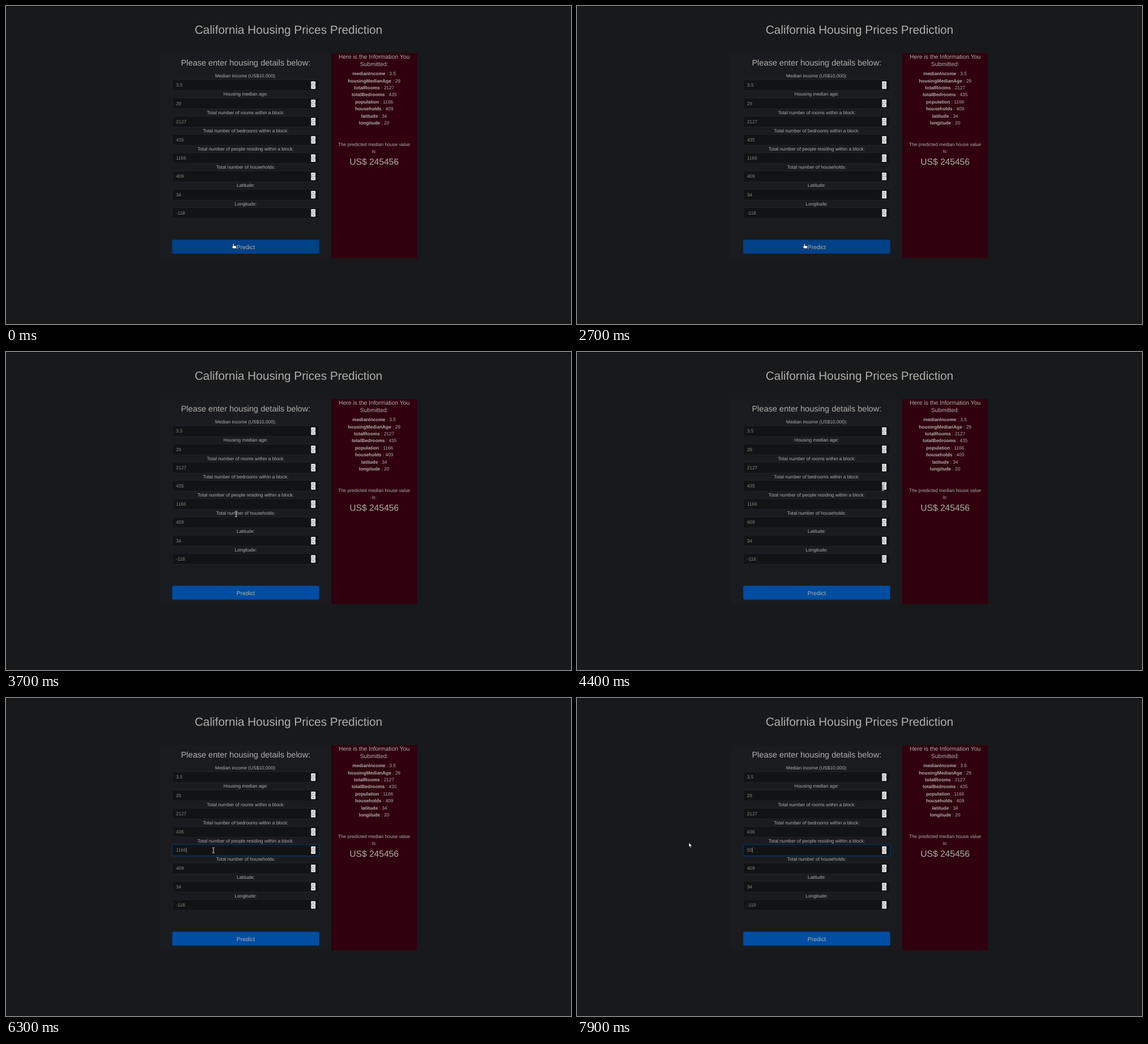
An HTML page that plays this animation: 997x561 px, repeating every 8 s.

```html
<!DOCTYPE html>
<html lang="en">
<head>
<meta charset="utf-8">
<title>Housing prices</title>
<style>
  html, body { margin: 0; width: 100%; height: 100%; overflow: hidden; background: #18191a; }
  svg { display: block; width: 997px; height: 561px; }
  text { font-family: "Liberation Sans", Arial, sans-serif; font-size: 8.31px; fill: #b0aeab; text-rendering: geometricPrecision; }
  .mid { text-anchor: middle; }
  .value { fill: #8b867e; }
  .bold { font-weight: bold; }
</style>
</head>
<body>
<svg id="stage" viewBox="0 0 997 561" xmlns="http://www.w3.org/2000/svg"></svg>
<script>
const LOOP = 8000, STEP = 100;
const FORM_X = 422.95, INFO_X = 649.6, VALUE_X = 300, ROW = 32.2;
const stage = document.getElementById('stage');

function add(tag, attrs, parent = stage) {
  const el = document.createElementNS('http://www.w3.org/2000/svg', tag);
  for (const key in attrs) el.setAttribute(key, attrs[key]);
  parent.append(el);
  return el;
}

function rect(x, y, width, height, fill, more) {
  return add('rect', { x, y, width, height, fill, ...more });
}

function label(str, x, y, size = 8.31, cls = 'mid') {
  const el = add('text', { x, y, class: cls, style: `font-size:${size}px` });
  el.textContent = str;
  return el;
}

// Page
rect(0, 0, 997, 1, '#0a0b0b');
rect(271.8, 83.2, 302.3, 361.8, '#1a1b1f');
rect(574.1, 83.2, 151.1, 361.8, '#30000e');
label('California Housing Prices Prediction', 498.5, 49.2, 20.77);
label('Please enter housing details below:', FORM_X, 105.2, 14.54);

// Form
const fields = [
  ['Median income (US$10,000):', '3.5'],
  ['Housing median age:', '29'],
  ['Total number of rooms within a block:', '2127'],
  ['Total number of bedrooms within a block:', '435'],
  ['Total number of people residing within a block:', '1166'],
  ['Total number of households:', '409'],
  ['Latitude:', '34'],
  ['Longitude:', '-118']
];

function spinner(cy) {
  const g = add('g', { transform: `translate(542.2 ${cy})`, fill: 'none', stroke: '#333', 'stroke-width': 0.9 });
  add('rect', { x: -3.8, y: -6.6, width: 7.6, height: 13.2, fill: '#f2f2f2', stroke: 'none' }, g);
  add('path', { d: 'M-3.8 0H3.8', stroke: '#777' }, g);
  add('path', { d: 'M-2.1-2.2L0-4.2 2.1-2.2M-2.1 2.2L0 4.2 2.1 2.2' }, g);
}

const inputs = fields.map(([name, value], i) => {
  const cy = 139.6 + i * ROW;
  label(name, FORM_X, 126.2 + i * ROW);
  const ring = rect(292.3, cy - 10.65, 261.3, 21.3, 'none',
    { rx: 2.8, stroke: '#004b9d', 'stroke-opacity': 0.28, 'stroke-width': 1.7, opacity: 0 });
  const box = rect(293.4, cy - 9.6, 259.1, 19.2, '#111315', { rx: 2, stroke: '#2a2d2f', 'stroke-width': 0.6 });
  const mark = rect(VALUE_X, cy - 4.7, 0, 9.4, '#003b83');
  const text = label(value, VALUE_X, cy + 2.7, 8.31, 'value');
  const caret = rect(0, cy - 4.7, 0.6, 9.4, '#b0aeab', { opacity: 0 });
  spinner(cy);
  return { ring, box, mark, text, caret };
});

const button = rect(293.35, 412.4, 259.2, 24.4, '#004da1', { rx: 2.4, stroke: '#00428a', 'stroke-width': 0.5 });
label('Predict', FORM_X, 428.6, 10.39);

// Submitted values
label('Here is the Information You', INFO_X, 93.4, 10.39);
label('Submitted:', INFO_X, 105.9, 10.39);
[
  ['medianIncome', '3.5'], ['housingMedianAge', '29'], ['totalRooms', '2127'], ['totalBedrooms', '435'],
  ['population', '1166'], ['households', '409'], ['latitude', '34'], ['longitude', '20']
].forEach(([key, value], i) => {
  const line = label('', INFO_X, 122.1 + i * 12.46);
  add('tspan', { class: 'bold' }, line).textContent = key;
  line.append(' : ' + value);
});
label('The predicted median house value', INFO_X, 246.8);
label('is:', INFO_X, 259.3);
label('US$ 245456', INFO_X, 279.8, 15.58);

// Pointers, each drawn around its hot spot
const outline = { fill: '#fff', stroke: '#0c0c0c', 'stroke-width': 0.7, 'stroke-linejoin': 'round' };
const beam = 'M-1.8-4.4Q0-4.4 0-3.4Q0-4.4 1.8-4.4M0-3.6V3.6M-1.8 4.4Q0 4.4 0 3.4Q0 4.4 1.8 4.4';
const pointers = { hand: add('g', {}), beam: add('g', {}), arrow: add('g', {}) };
add('path', { d: 'M-1 1Q-1 0 0 0T1 1V3.5L4.8 4.3Q5.8 4.6 5.6 6L4.9 8.9H0L-3 5.8Q-3.2 4.2-1 5.2Z', ...outline }, pointers.hand);
add('path', { d: beam, fill: 'none', stroke: '#d8d8d8', 'stroke-width': 1.6 }, pointers.beam);
add('path', { d: beam, fill: 'none', stroke: '#151515', 'stroke-width': 0.55 }, pointers.beam);
add('path', { d: 'M0 0V8.2L1.9 6.5 3.2 9.5 4.5 8.9 3.2 6H5.7Z', ...outline }, pointers.arrow);

// time, x, y, pointer
const path = [
  [0, 401.2, 419, 'hand'],
  [3500, 401.2, 419, 'hand'],
  [3600, 403, 352, 'beam'],
  [3700, 406, 285.5, 'beam'],
  [3800, 424, 238, 'beam'],
  [3900, 454, 210, 'beam'],
  [4000, 488, 202, 'beam'],
  [4200, 529, 224, 'beam'],
  [4400, 540, 240, 'beam'],
  [4500, 541, 237, 'arrow'],
  [4600, 541.5, 234, 'arrow'],
  [5400, 541.5, 234, 'arrow'],
  [5500, 530, 243, 'beam'],
  [5600, 484, 266, 'beam'],
  [5700, 424, 286, 'beam'],
  [5800, 380.3, 291, 'beam'],
  [6000, 371, 282, 'beam'],
  [6200, 366, 268.5, 'beam'],
  [6300, 366, 268.5, 'beam'],
  [6600, 266, 263, 'arrow'],
  [6800, 197.4, 254.9, 'arrow'],
  [LOOP, 197.4, 254.9, 'arrow']
];

function pointerAt(t) {
  const i = path.findIndex(p => p[0] > t);
  const [t0, x0, y0, kind] = path[i - 1], [t1, x1, y1] = path[i];
  const k = (t - t0) / (t1 - t0);
  return { x: x0 + (x1 - x0) * k, y: y0 + (y1 - y0) * k, kind };
}

function render(time) {
  const t = Math.floor(time % LOOP / STEP) * STEP;
  const pos = pointerAt(t);
  for (const kind in pointers) {
    pointers[kind].setAttribute('visibility', kind === pos.kind ? 'visible' : 'hidden');
    pointers[kind].setAttribute('transform', `translate(${pos.x} ${pos.y})`);
  }

  button.setAttribute('fill', t < 3600 ? '#004187' : t < 3700 ? '#004794' : '#004da1');
  inputs[3].text.textContent = t < 4900 ? '435' : '436';

  const people = inputs[4];
  const value = t < 7700 ? '1166' : t < 7900 ? '5' : '50';
  const end = VALUE_X + value.length * 4.62;
  const focus = t < 6200 ? 0 : t < 6300 ? 0.5 : 1;
  const selecting = t >= 6400 && t < 7700;
  const from = Math.max(VALUE_X, Math.min(end, pos.x));
  const marked = selecting ? end - from : 0;
  people.text.textContent = value;
  people.text.style.fill = marked > 9 ? '#b0aeab' : '';
  people.ring.setAttribute('opacity', focus);
  people.box.setAttribute('stroke', ['#2a2d2f', '#153553', '#003c77'][focus * 2]);
  people.mark.setAttribute('x', from);
  people.mark.setAttribute('width', marked);
  people.caret.setAttribute('x', end);
  people.caret.setAttribute('opacity', focus && !marked ? 1 : 0);
}

const start = performance.now();
function tick() {
  render(performance.now() - start);
  requestAnimationFrame(tick);
}
tick();
</script>
</body>
</html>
```
